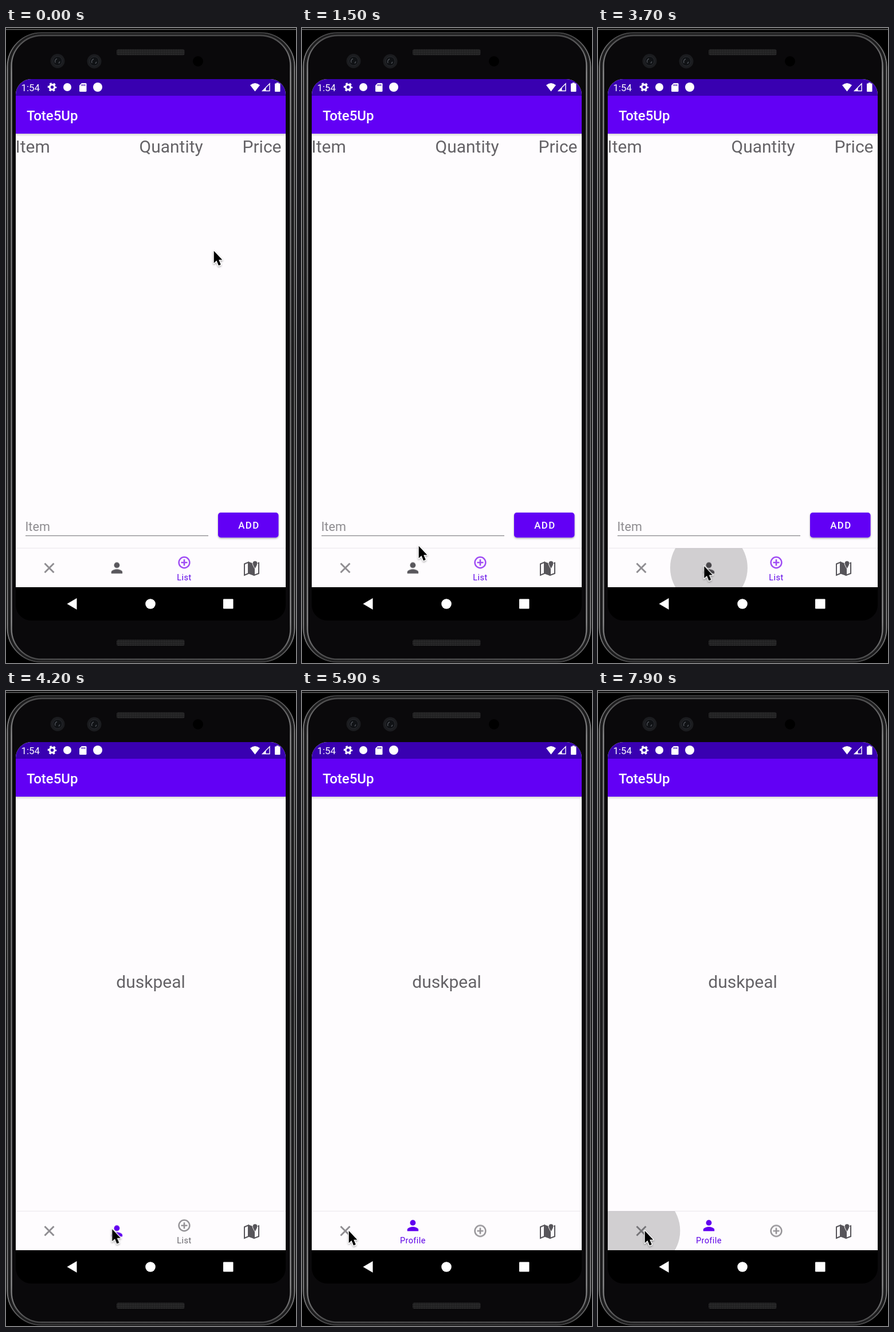
Recreate the animation shown at these times as an HTML page. Size 506 px wide and 1106 px high, loop 8 s.

```html
<!DOCTYPE html>
<html lang="en">
<head>
<meta charset="utf-8">
<title>Shopping list app</title>
<style>
  html, body { margin: 0; width: 100%; height: 100%; overflow: hidden; background: #000; }
  svg { display: block; width: 100vw; height: 100vh; font-family: Roboto, sans-serif; }
  .medium { font-weight: 500; }
  .heading { font-size: 30px; fill: #656367; }
  .label { font-size: 14.4px; letter-spacing: .48px; text-anchor: middle; }
  .mid { text-anchor: middle; }

  .cursor, .list-page, .profile-page, .person, .person-icon, .person-label,
  .add, .add-icon, .add-label, .add-text, .toast, .tap1, .tap2 {
    animation: 8s linear infinite;
  }
  .list-page, .profile-page, .person, .add, .add-text { animation-timing-function: step-end; }

  .cursor { animation-name: point; }
  @keyframes point {
    0%, 5% { transform: translate(362px, 387px); animation-timing-function: steps(11); }
    18.75% { transform: translate(203px, 901px); animation-timing-function: steps(3); }
    22.5%, 67.5% { transform: translate(184.500px, 936px); animation-timing-function: steps(4); }
    72.5%, 100% { transform: translate(81px, 939px); }
  }

  .list-page { animation-name: leave; }
  @keyframes leave { 0% { opacity: 1; } 48.75%, 100% { opacity: 0; } }
  .profile-page { animation-name: enter; }
  @keyframes enter { 0% { opacity: 0; } 48.75%, 100% { opacity: 1; } }

  .person { animation-name: select; }
  @keyframes select { 0% { color: #59575c; } 48.75%, 100% { color: #6200f0; } }
  .add { animation-name: deselect; }
  @keyframes deselect { 0% { color: #a04ef4; } 48.75%, 100% { color: #969498; } }
  .add-text { animation-name: deselect-text; }
  @keyframes deselect-text { 0% { fill: #5e00e6; } 48.75%, 100% { fill: #66646a; } }

  .person-icon { animation-name: lift; }
  @keyframes lift { 0%, 57.5% { transform: translateY(9.4px); } 60%, 100% { transform: none; } }
  .add-icon { animation-name: drop; }
  @keyframes drop { 0%, 57.5% { transform: none; } 60%, 100% { transform: translateY(9.4px); } }
  .person-label { animation-name: show; }
  @keyframes show { 0%, 57.5% { opacity: 0; } 60%, 100% { opacity: 1; } }
  .add-label { animation-name: hide; }
  @keyframes hide { 0%, 57.5% { opacity: 1; } 60%, 100% { opacity: 0; } }

  .toast { animation-name: toast; }
  @keyframes toast {
    0%, 57.5% { opacity: 0; transform: translateY(40px); }
    60%, 68.75% { opacity: 1; transform: none; }
    71.25%, 100% { opacity: 0; transform: translateY(40px); }
  }

  .tap1, .tap2 { transform-box: fill-box; transform-origin: center; fill: #000; }
  .tap1 { animation-name: tap1; }
  @keyframes tap1 {
    0%, 42.5% { opacity: 0; transform: scale(.4); }
    43.75%, 47.5% { opacity: .18; transform: none; }
    48.75%, 100% { opacity: 0; transform: none; }
  }
  .tap2 { animation-name: tap2; }
  @keyframes tap2 {
    0%, 83.75% { opacity: 0; transform: scale(.4); }
    86.25%, 100% { opacity: .18; transform: none; }
  }
</style>
</head>
<body>
<svg viewBox="0 0 506 1106" preserveAspectRatio="none">
  <defs>
    <clipPath id="screen"><rect x="17" y="89" width="471" height="943" rx="27"/></clipPath>
    <clipPath id="tabs"><rect x="17" y="906.500" width="471" height="67.500"/></clipPath>
    <pattern id="mesh" width="3" height="3" patternUnits="userSpaceOnUse">
      <rect width="3" height="3" fill="#1b1b1c"/>
      <circle cx="1" cy="1" r=".9" fill="#39393a"/>
    </pattern>
    <linearGradient id="fade" x2="0" y2="1">
      <stop stop-color="#000" stop-opacity=".16"/>
      <stop offset="1" stop-color="#000" stop-opacity="0"/>
    </linearGradient>
    <linearGradient id="rim" x2="0" y2="1">
      <stop stop-color="#4a4a4b"/>
      <stop offset=".06" stop-color="#8c8c8d"/>
      <stop offset=".5" stop-color="#6a6a6b"/>
      <stop offset=".94" stop-color="#8c8c8d"/>
      <stop offset="1" stop-color="#4a4a4b"/>
    </linearGradient>
    <filter id="soft" x="-40%" y="-30%" width="180%" height="180%">
      <feDropShadow dx="0" dy="1.500" stdDeviation="1.500" flood-opacity=".35"/>
    </filter>
    <g id="lens">
      <circle r="12.500" fill="#1b1c1f"/>
      <circle r="8" fill="#101215" stroke="#292b30"/>
      <path d="M-4 3a5 5 0 0 1 3-7M2 4l2-3" fill="none" stroke="#4b4e54" stroke-width="1.500"/>
    </g>
  </defs>

  <!-- Phone body -->
  <rect width="506" height="1106" fill="#000"/>
  <path d="M0 2.500H506" stroke="#6d6d6d" stroke-width="1.500"/>
  <g fill="#0a090b">
    <rect x="2.500" y="8.500" width="501" height="1095.500" rx="59" stroke="url(#rim)" stroke-width="2"/>
    <rect x="6" y="11" width="494" height="1090.500" rx="56" stroke="#1c1c1d" stroke-width="4"/>
    <rect x="9.500" y="13" width="487" height="1086.500" rx="53" stroke="url(#rim)" stroke-width="2.400"/>
  </g>
  <rect x="193" y="37" width="118.500" height="10.500" rx="3" fill="url(#mesh)"/>
  <rect x="193" y="1065.500" width="118.500" height="10.500" rx="3" fill="url(#mesh)"/>
  <use href="#lens" x="90" y="57.500"/>
  <use href="#lens" x="154" y="58"/>
  <circle cx="335" cy="58" r="9" fill="#000"/>

  <g clip-path="url(#screen)">
    <rect x="16" y="89" width="473" height="885" fill="#fefcfe"/>
    <rect x="16" y="184" width="473" height="5" fill="url(#fade)"/>
    <rect x="16" y="89" width="473" height="29" fill="#3900b1"/>
    <rect x="16" y="118" width="473" height="66" fill="#6200f5"/>
    <rect x="16" y="974" width="473" height="58" fill="#000"/>

    <!-- Status bar -->
    <g fill="#fff">
      <text x="26.500" y="110" font-size="16.800">1:54</text>
      <g transform="translate(80.500 103)" fill="none" stroke="#fff">
        <circle r="4.300" stroke-width="3.200"/>
        <circle r="6.500" stroke-width="2.600" stroke-dasharray="3.400 3.407" stroke-dashoffset="1.700"/>
      </g>
      <circle cx="107" cy="103" r="7"/>
      <path d="M132 96h7q1.500 0 1.500 1.500v12q0 1.500-1.500 1.500h-9.500q-1.500 0-1.500-1.500V100z"/>
      <path d="M132.500 98v3M135 98v3M137.500 98v3" stroke="#3900b1" stroke-width="1.200"/>
      <circle cx="160" cy="103" r="8"/>
      <path d="M434.500 110.500L426 99.500q8.500-7 17 0z"/>
      <path d="M447.500 109.500h12.500v-12.500z" fill="none" stroke="#fff" stroke-width="1.400"/>
      <path d="M453.500 103.500v6h-6z"/>
      <path d="M472 95h3.500v1.500h2q1 0 1 1v12.500q0 1-1 1h-7.500q-1 0-1-1v-12.500q0-1 1-1h2z"/>
    </g>
    <text class="medium" x="36" y="160.500" font-size="24" fill="#fff">Tote5Up</text>

    <g class="list-page">
      <g class="heading">
        <text x="16.500" y="217">Item</text>
        <text x="232.500" y="217">Quantity</text>
        <text x="412.500" y="217">Price</text>
      </g>
      <text x="33.500" y="875.500" font-size="21.600" fill="#8d8b8f">Item</text>
      <path d="M34 884.300H353" stroke="#88868a" stroke-width="1.300"/>
      <rect x="370" y="844" width="105.500" height="43.500" rx="4.800" fill="#6200f5" filter="url(#soft)"/>
      <text class="medium mid" x="424" y="872.300" font-size="16.800" letter-spacing="1.500" fill="#fff">ADD</text>
    </g>
    <text class="heading mid profile-page" x="252.500" y="517">duskpeal</text>

    <!-- Tabs -->
    <path d="M16 906H489" stroke="#efedf0" stroke-width="1.400"/>
    <path d="M67.500 932.500l16 16m0-16l-16 16" stroke="#8f8d91" stroke-width="2.900"/>
    <g class="person">
      <g class="person-icon" fill="currentColor">
        <circle cx="193.400" cy="926.200" r="4.900"/>
        <path d="M183.700 940.800v-2.500c0-3.300 6.500-5 9.700-5s9.700 1.700 9.700 5v2.500z"/>
      </g>
    </g>
    <text class="label person-label" x="193.400" y="962" fill="#5e00e6">Profile</text>
    <g class="add">
      <g class="add-icon" fill="none" stroke="currentColor" stroke-width="2.500">
        <circle cx="311" cy="931" r="9.400"/>
        <path d="M305.500 931h11M311 925.500v11" stroke-width="2.700"/>
      </g>
    </g>
    <g class="add-label"><text class="label add-text" x="311" y="962">List</text></g>
    <g fill="#57555a">
      <path d="M416 933.500l7-3v19.500l-7 3zM433 934l8-2.500v18.500l-8 3z" fill="none" stroke="#57555a" stroke-width="2"/>
      <path d="M423 929.500l9.500 3.500v21l-9.500-3.500z"/>
      <path d="M434.500 928a4.400 4.400 0 0 1 4.400 4.400c0 3-4.400 9.600-4.400 9.600s-4.400-6.600-4.400-9.600a4.400 4.400 0 0 1 4.400-4.400z" stroke="#fefcfe"/>
    </g>
    <g clip-path="url(#tabs)">
      <circle class="tap1" cx="193.400" cy="940" r="67.500"/>
      <circle class="tap2" cx="75.800" cy="940" r="67.500"/>
    </g>

    <!-- System navigation -->
    <g fill="#fff">
      <path d="M106.500 1003l17-10v20z"/>
      <circle cx="252" cy="1003" r="8.800"/>
      <rect x="379" y="994.500" width="17.500" height="17" rx="1"/>
    </g>

    <g class="toast">
      <rect x="199" y="886" width="106.500" height="59" rx="28" fill="#eeedef"/>
      <text class="mid" x="252.200" y="922.300" font-size="16.800" fill="#1c1b1d">Profile</text>
    </g>
  </g>

  <g class="cursor">
    <path d="M.7 1.300V22.600l4.700-4.500 3.600 8.600 3.800-1.600-3.600-8.400h6.200z" fill="#000" stroke="#fff"
          stroke-width="2.600" paint-order="stroke" stroke-linejoin="round" filter="url(#soft)"/>
  </g>
</svg>
</body>
</html>
```
